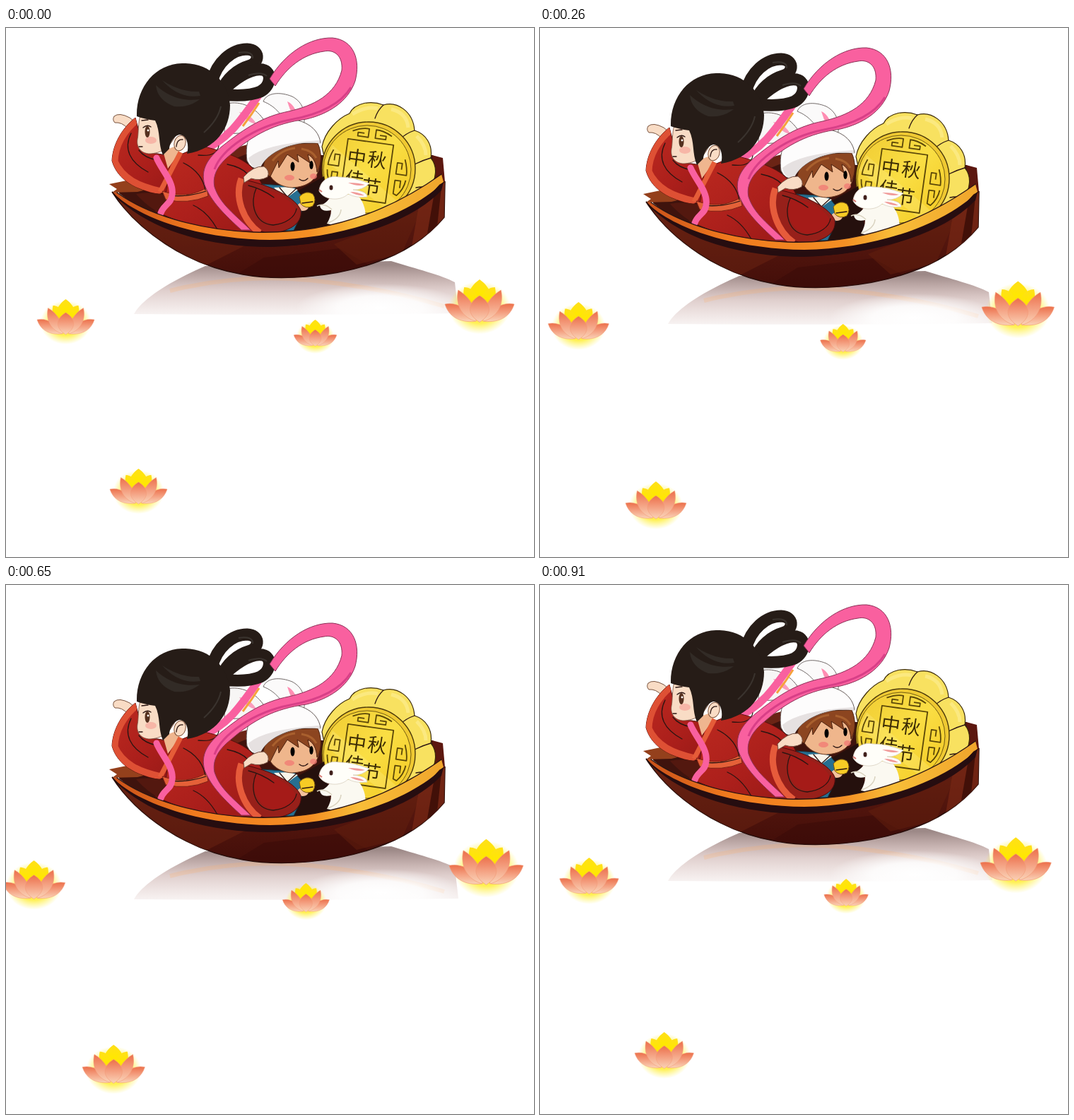
An HTML page for the animation above (1040 ms loop, 747 by 749 pixels).

```html
<!DOCTYPE html>
<html lang="zh">
<head>
<meta charset="utf-8">
<title>中秋佳节</title>
<style>
@property --u { syntax: "<number>"; inherits: true; initial-value: 0; }
@property --bob { syntax: "<length>"; inherits: true; initial-value: 0px; }
html, body { margin: 0; width: 100%; height: 100%; overflow: hidden; background: #fff; }
svg { display: block; width: 747px; height: 749px; animation: float 1040ms step-end infinite; }
@keyframes float {
  0% { --u: 0; --bob: 0px; }
  12.5% { --u: .25; --bob: 0px; }
  25% { --u: .5; --bob: 14px; }
  37.5% { --u: .75; --bob: 26px; }
  50% { --u: 1; --bob: 40px; }
  62.5% { --u: .75; --bob: 40px; }
  75% { --u: .5; --bob: 26px; }
  87.5% { --u: .25; --bob: 14px; }
  100% { --u: 0; --bob: 0px; }
}
.boat { transform: translateY(var(--bob)); }
.lotus {
  transform:
    translate(calc(var(--x) + var(--dx) * var(--u)), calc(var(--y) + var(--dy) * var(--u)))
    scale(calc(var(--s) + var(--ds) * var(--u)));
}
.line { fill: none; stroke: #2b1512; stroke-width: 1.3; stroke-linecap: round; stroke-linejoin: round; }
.gold { fill: none; stroke: #5b4708; stroke-width: 1.8; stroke-linejoin: round; }
.ribbon { fill: none; stroke: #f9609f; stroke-linecap: round; }
.hair { fill: #261c17; }
.bun { fill: none; stroke: #261c17; stroke-width: 17; stroke-linejoin: round; }
.skin { fill: #f9dcc5; }
.cake { font: 400 27px "Noto Sans CJK SC", "Noto Sans CJK", sans-serif; fill: #3d2d05; text-anchor: middle; }
</style>
</head>
<body>
<svg viewBox="0 0 747 749">
  <defs>
    <linearGradient id="rim" x1="150" x2="617" gradientUnits="userSpaceOnUse">
      <stop offset="0" stop-color="#c8501a"/><stop offset=".25" stop-color="#f07a1e"/>
      <stop offset=".6" stop-color="#f48f24"/><stop offset=".75" stop-color="#f8bd38"/><stop offset="1" stop-color="#f0a62c"/>
    </linearGradient>
    <linearGradient id="hull" x1="0" y1="0" x2="0" y2="1">
      <stop offset="0" stop-color="#6a2315"/><stop offset=".5" stop-color="#54160e"/><stop offset="1" stop-color="#430e09"/>
    </linearGradient>
    <linearGradient id="robe" x1="0" y1="0" x2="1" y2="1">
      <stop offset="0" stop-color="#bd2a20"/><stop offset=".55" stop-color="#ab1f1b"/><stop offset="1" stop-color="#931816"/>
    </linearGradient>
    <linearGradient id="face" x1="0" y1="0" x2="1" y2="1">
      <stop offset="0" stop-color="#f0cb32"/><stop offset=".5" stop-color="#fade44"/><stop offset="1" stop-color="#f3c922"/>
    </linearGradient>
    <linearGradient id="shade" x1="0" y1="335" x2="0" y2="408" gradientUnits="userSpaceOnUse">
      <stop offset="0" stop-color="#4c2825" stop-opacity=".55"/><stop offset=".5" stop-color="#85463f" stop-opacity=".26"/>
      <stop offset="1" stop-color="#a5645c" stop-opacity=".07"/>
    </linearGradient>
    <radialGradient id="clear">
      <stop offset="0" stop-color="#fff"/><stop offset=".5" stop-color="#fff" stop-opacity=".85"/><stop offset="1" stop-color="#fff" stop-opacity="0"/>
    </radialGradient>
    <radialGradient id="glow">
      <stop offset="0" stop-color="#ffe600"/><stop offset=".6" stop-color="#ffec20" stop-opacity=".75"/><stop offset="1" stop-color="#fff04a" stop-opacity="0"/>
    </radialGradient>
    <linearGradient id="petal" x1="0" y1="0" x2="0" y2="1">
      <stop offset="0" stop-color="#ec6f4a"/><stop offset=".5" stop-color="#f4a081"/><stop offset="1" stop-color="#fad3b8"/>
    </linearGradient>
    <linearGradient id="core" x1="0" y1="0" x2="0" y2="1">
      <stop offset="0" stop-color="#ffdf1a"/><stop offset=".5" stop-color="#ffe800"/><stop offset="1" stop-color="#ffbd38"/>
    </linearGradient>
    <g id="side" fill="url(#petal)" stroke="#f29a76" stroke-width=".5">
      <path fill="url(#core)" stroke="none" d="M-18 9C-9 9 0 18 1 32L-16 36C-18 27-20 18-18 9Z"/>
      <path d="M-40.5 29C-27 26-14 34-5 49C-24 51-36 43-40.5 29Z"/>
      <path d="M-25 12.500C-12 20-4 33-4 49C-20 45-29 30-25 12.500Z"/>
    </g>
    <g id="lotus">
      <ellipse cy="33" rx="36" ry="31" fill="url(#glow)"/>
      <path d="M0 0C10 7 17 18 13 34H-13C-17 18-10 7 0 0Z" fill="url(#core)"/>
      <use href="#side"/><use href="#side" transform="scale(-1 1)"/>
      <path d="M0 19C15 28 15 41 0 50C-15 41-15 28 0 19Z" fill="url(#petal)" stroke="#f29a76" stroke-width=".5"/>
    </g>
    <path id="hullShape" d="M150 232C180 270 270 305 370 309C470 307 570 275 614 222L621 218L620 268C594 299 560 320 520 333C465 352 390 359 335 349C255 336 184 285 150 232Z"/>
    <path id="sleeve" d="M183 127C164 142 151 165 150 188C158 216 185 229 216 235L240 228L255 185L215 178C195 178 186 165 189 150Z"/>
    <clipPath id="hullClip"><use href="#hullShape"/></clipPath>
    <clipPath id="sleeveClip"><use href="#sleeve"/></clipPath>
  </defs>

  <g class="boat">
    <!-- water shadow -->
    <path d="M181 405C194 381 240 355 282 337L545 330C580 341 617 350 635 360L640 404Q410 407 181 405Z" fill="url(#shade)"/>
    <path d="M232 372Q330 347 430 357T620 394" fill="none" stroke="#ffab66" stroke-opacity=".22" stroke-width="6"/>
    <ellipse cx="530" cy="396" rx="120" ry="34" fill="url(#clear)"/>

    <!-- inside of the boat -->
    <path d="M160 222L215 225L305 182L345 164L445 180L604 180L616 207C560 262 480 300 400 300C300 300 210 275 160 234Z" fill="#3f130d"/>
    <path d="M303 183Q325 168 346 164V176L312 190Z" fill="#6b2415"/>
    <path d="M146 221L180 214L206 227L186 232L150 233L157 228Z" fill="#94401c"/>
    <path d="M603 180L618 184L621 218L608 226Z" fill="#5c170f"/>

    <!-- mooncake -->
    <path d="M447 168C451 147 469 128 486 121C493 106 516 102 534 109C553 103 576 118 578 145C594 150 604 165 601 184C611 196 609 214 599 226L520 272L465 252Z" fill="#f8e160" stroke="#3b2a08" stroke-width="1.2"/>
    <path class="line" d="M534 109Q526 116 522 128M578 145Q566 149 558 157M601 184Q590 187 578 193M599 226Q590 224 580 226"/>
    <path d="M490 122Q510 110 526 114M545 115Q567 120 569 141M581 153Q594 166 594 180" fill="none" stroke="#fff2a0" stroke-width="5" opacity=".5"/>
    <circle cx="513" cy="199" r="66" fill="#efc932" stroke="#4c390a" stroke-width="1.4"/>
    <circle cx="511" cy="200" r="62" fill="url(#face)" stroke="#725a10"/>
    <path d="M462 166L552 244L538 257L452 188Z" fill="#fff49a" opacity=".25"/>
    <g transform="translate(511 201) rotate(8)">
      <path class="gold" d="M-33-40H32V43H-33Z"/>
      <path class="gold" d="M-28-52Q-14-59-5-58V-46H-20V-51H-11M28-52Q14-59 5-58V-46H20V-51H11"/>
      <path class="gold" d="M-51-22Q-56-10-56 0H-41V-16H-48V-7M-56 7Q-55 20-46 30L-41 28V9H-49V19"/>
      <path class="gold" d="M51-22Q56-10 56 0H41V-16H48V-7M56 7Q55 20 46 30L41 28V9H49V19"/>
      <text class="cake"><tspan x="-17" y="-5">中</tspan><tspan x="12" y="-6">秋</tspan><tspan x="-16" y="25">佳</tspan><tspan x="9" y="33">节</tspan></text>
    </g>

    <!-- boy -->
    <path d="M405 235L450 210L462 285L400 292Z" fill="#25100d"/>
    <path d="M362 221L407 224L423 243L415 270L407 287L378 287Z" fill="#266f91" stroke="#17333e"/>
    <path d="M379 226L395 242L413 229L401 225Z" fill="#f8f4e9"/>
    <path d="M387 226L398 239L410 228" class="line"/>
    <path d="M310 108C327 102 350 109 364 129L352 148L309 150Z" fill="#f7f6f5" stroke="#706564"/>
    <path d="M330 119Q346 121 355 137Q338 132 330 119Z" fill="#fb9dbd"/>
    <path d="M367 181C372 168 440 162 444 190C443 216 425 225 405 226C382 225 366 209 367 181Z" fill="#efb68c" stroke="#68371e"/>
    <path d="M364 207C362 183 374 169 402 164L441 163C447 176 447 193 440 204C439 191 435 183 427 179L430 191L412 179L414 190L398 179L386 198L385 188L374 210Z" fill="#8c4520" stroke="#4b210f"/>
    <path d="M377 188Q390 172 409 170M418 171Q434 174 439 184" fill="none" stroke="#a9602e" stroke-width="3"/>
    <ellipse cx="405.500" cy="196" rx="3" ry="6.500"/><ellipse cx="432" cy="194" rx="2.700" ry="6"/>
    <path class="line" d="M415 214Q421 219 427 213"/>
    <ellipse cx="401" cy="212" rx="7" ry="4" fill="#f27873" opacity=".75"/><ellipse cx="435" cy="210" rx="5" ry="4" fill="#f27873" opacity=".75"/>
    <path d="M364 104C369 91 388 90 405 97C420 105 425 120 421 138L402 148C393 125 382 111 364 104Z" fill="#fbfafa" stroke="#716968"/>
    <path d="M398 104Q412 110 414 136Q404 124 398 104Z" fill="#ff8db2"/>
    <path d="M341 188C337 159 347 135 379 130C412 124 442 137 445 163C420 158 371 170 359 199Q347 201 341 188Z" fill="#fdfcfc" stroke="#665b58"/>
    <path d="M343 184Q366 164 443 159L445 164C413 158 372 171 359 199Q346 199 343 184Z" fill="#e6e1e1"/>
    <ellipse cx="420" cy="253" rx="8" ry="6" fill="#f4c29d"/>
    <path d="M415 239Q424 229 434 235Q440 243 434 252Q424 257 417 249Z" fill="#f7cb25" stroke="#775510"/>
    <path d="M419 248L434 246" class="line"/>

    <!-- white rabbit -->
    <path d="M444 251C453 249 457 242 460 238L495 235C507 244 512 265 506 276Q480 284 454 277Q460 267 460 258Q445 261 444 251Z" fill="#fbf9f1"/>
    <path d="M443 231C444 216 457 208 471 211C491 211 507 218 514 220Q504 230 491 229Q511 231 511 239Q495 241 484 235C473 246 450 244 443 231Z" fill="#fffef9" stroke="#d8d0c0" stroke-width=".8"/>
    <path d="M484 219Q499 219 508 222Q497 225 484 219ZM487 232Q498 232 507 237Q496 238 487 232Z" fill="#f09a99"/>
    <path d="M440 252Q450 247 461 257M455 276Q473 270 474 257M477 276Q496 267 506 275" fill="none" stroke="#d9d2bf" stroke-width="1.5"/>
    <ellipse cx="460" cy="226" rx="2.500" ry="3.500" fill="#40201c"/><path d="M443 229L447 232" stroke="#d67870" stroke-width="2"/>

    <!-- strand behind the girl -->
    <path class="ribbon" d="M272 176C314 160 332 132 368 80" stroke-width="11"/>
    <path d="M335 139Q348 122 358 106" fill="none" stroke="#f6a13c" stroke-width="3"/>

    <!-- girl -->
    <path class="skin" d="M153 125Q160 119 175 127L181 132L172 142Q164 133 154 134Q150 130 153 125Z" stroke="#78523e"/>
    <use href="#sleeve" fill="url(#robe)" stroke="#54100c"/>
    <path d="M184 126C164 142 150 165 150 190C162 217 187 228 219 235" fill="none" stroke="#de5034" stroke-width="17" clip-path="url(#sleeveClip)"/>
    <path class="line" d="M177 149C166 171 175 190 201 204M188 173Q196 184 214 187"/>
    <path d="M233 185L276 167C309 174 346 188 354 206L395 284L350 294C297 291 251 279 211 259L226 235Z" fill="url(#robe)" stroke="#5a100e"/>
    <path d="M184 235Q208 231 230 238L220 263Q202 255 184 235Z" fill="#53180f"/>
    <path d="M222 174L246 165L245 177L229 199Z" fill="#efb68f"/>
    <path d="M247 176L218 232" fill="none" stroke="#e55c38" stroke-width="7"/>
    <path d="M221 231Q256 243 284 226L286 238Q257 250 226 243Z" fill="#e46138" stroke="#7d2015"/>
    <path class="line" d="M231 237Q256 240 283 231M272 180Q298 183 301 167M251 191Q277 204 282 229M313 193Q333 197 342 207M265 251Q285 260 299 285"/>
    <path class="ribbon" d="M213 184C220 201 238 218 235 236C234 249 223 250 219 262" stroke-width="9"/>
    <path d="M332 214C362 219 408 236 417 258C420 278 399 289 371 291C346 285 327 261 332 214Z" fill="#97201a" stroke="#4d0b0b"/>
    <path d="M355 226C388 232 413 249 410 264C402 279 378 282 363 271C350 258 347 240 355 226Z" fill="#a51b18"/>
    <path class="line" d="M354 227C345 246 350 277 378 279C396 277 409 268 411 256M343 223Q363 228 379 240"/>
    <path d="M333 213C323 239 335 273 359 290" fill="none" stroke="#e65b3b" stroke-width="9"/>
    <path class="skin" d="M336 211Q350 195 365 196Q374 202 370 211Q359 217 347 213L337 219Z" stroke="#765041"/>

    <path class="skin" d="M191 120C186 136 188 148 186 157C184 169 191 178 204 178C219 177 230 171 239 154L229 118Z" stroke="#754d3b" stroke-width=".8"/>
    <path class="bun" d="M291 77C298 48 320 30 341 30C360 31 358 48 346 53C326 59 312 72 306 88"/>
    <path class="bun" d="M304 91C321 74 345 56 363 59C377 62 375 82 360 90C344 97 323 96 305 94"/>
    <path class="hair" d="M185 125C184 84 211 51 249 50C287 48 315 76 317 109C317 142 298 171 256 178C260 163 254 151 245 151C236 153 231 166 231 171L222 180C215 164 219 147 211 131Q196 129 185 125Z"/>
    <path d="M212 81Q239 106 274 101Q259 113 238 111Q214 102 212 81ZM221 74Q246 91 273 90L275 96Q245 101 221 74Z" fill="#322b26"/>
    <path d="M280 148Q300 130 304 111M329 35Q350 32 349 43M343 67Q361 61 369 68" fill="none" stroke="#3a332e" stroke-width="2"/>
    <ellipse class="skin" cx="246" cy="163" rx="8" ry="11" transform="rotate(15 246 163)" stroke="#82543c"/>
    <path d="M241 168Q242 157 250 158" class="line"/>
    <ellipse cx="200" cy="147" rx="3.500" ry="8" fill="#54301f"/><path class="line" d="M194 141Q200 136 205 140M192 131L201 130M188 168L193 168"/>
    <circle cx="201" cy="145" r="1.400" fill="#fff"/><ellipse cx="205" cy="159" rx="8" ry="5" fill="#f58f89" opacity=".5"/>

    <!-- long ribbon -->
    <path d="M373 72C395 35 430 13 462 14C492 17 502 45 494 75C484 105 455 122 425 129C380 135 350 151 318 179C298 195 292 210 295 225C303 250 325 265 346 286L333 286C310 265 290 246 281 222C275 200 285 185 305 168C340 140 365 125 400 118C435 110 466 95 475 60C477 40 465 30 450 33C420 37 397 56 381 82Z" fill="#f9609f" stroke="#8c3157"/>
    <path d="M488 84C473 109 440 123 402 130C350 140 305 172 295 200" fill="none" stroke="#d83f87" stroke-width="3"/>

    <!-- rim and hull -->
    <path d="M157 233C198 263 269 286 350 289C437 292 528 270 616 207L619 218C571 267 470 302 378 303C287 303 196 278 150 233Z" fill="url(#rim)"/>
    <path d="M157 233C198 263 269 286 350 289C437 292 528 270 616 207" class="line"/>
    <use href="#hullShape" fill="url(#hull)" stroke="#260d0a" stroke-width="1.5"/>
    <g clip-path="url(#hullClip)">
      <path d="M160 245L350 302L279 338L190 292Z" fill="#702612" opacity=".45"/>
      <path d="M318 354L365 325L472 312L521 340L430 361Z" fill="#390b08" opacity=".5"/>
      <path d="M464 306L587 258L560 319L496 335Z" fill="#64200f" opacity=".5"/>
      <path d="M584 252L625 213L621 280L574 309Z" fill="#7a2914" opacity=".65"/>
      <path d="M608 222L617 216L610 281L596 291Z" fill="#421008"/>
    </g>
    <path d="M150 232C189 272 280 299 374 300C467 299 568 268 619 218L616 230C568 280 470 307 373 310C276 310 191 281 150 232Z" fill="#260d10"/>
  </g>

  <use class="lotus" href="#lotus" style="--x:84.5px;--dx:-60px;--y:384px;--dy:8px;--s:1;--ds:.12"/>
  <use class="lotus" href="#lotus" style="--x:670px;--dx:12.5px;--y:356px;--dy:5px;--s:1.21;--ds:.11"/>
  <use class="lotus" href="#lotus" style="--x:437.5px;--dx:-17.5px;--y:413px;--dy:12px;--s:.75;--ds:.09"/>
  <use class="lotus" href="#lotus" style="--x:187.5px;--dx:-47px;--y:624px;--dy:36px;--s:1;--ds:.12"/>
</svg>
</body>
</html>
```
